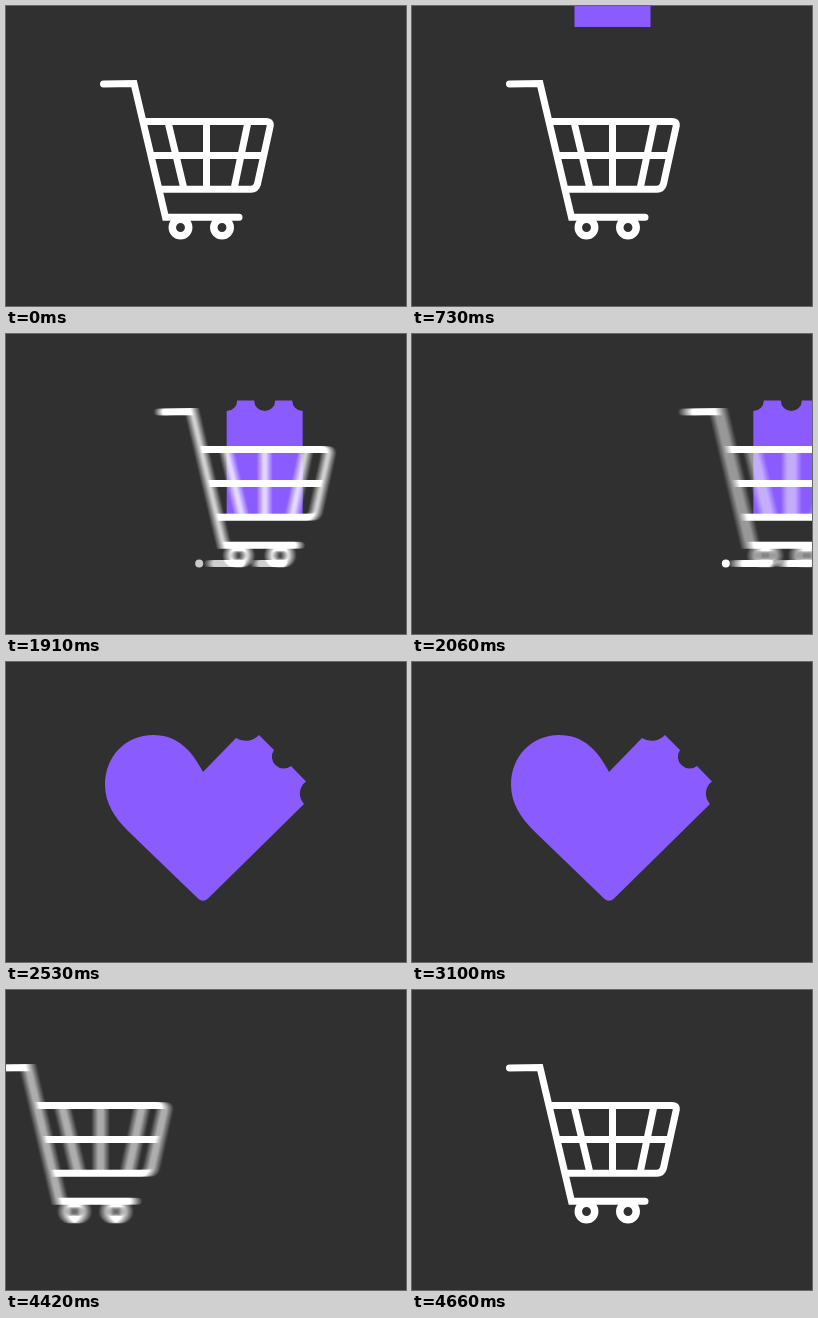
An HTML page with a canvas that plays this animation: 400 px wide and 300 px high, repeating every 4.69 s.

```html
<!DOCTYPE html>
<html lang="en">
<head>
<meta charset="utf-8">
<title>Cart and heart</title>
<style>
  html, body { margin: 0; width: 100%; height: 100%; overflow: hidden; background: #303030; }
  canvas { display: block; }
</style>
</head>
<body>
<canvas id="stage" width="400" height="300"></canvas>
<script>
const WIDTH = 400, HEIGHT = 300, LOOP = 4690, FRAME = 30;
const BACKGROUND = '#303030', PURPLE = '#8a5cff', WHITE = '#fff';
const BLUR_SAMPLES = 15;

const ctx = document.getElementById('stage').getContext('2d');

const ticket = new Path2D(`M173 66.5 H190 A10.5 10.5 0 0 0 211 66.5 H228
  A10.5 10.5 0 0 0 238.5 77 V180 H162.5 V77 A10.5 10.5 0 0 0 173 66.5 Z`);

const heart = new Path2D(`M197 110 C186 89 172 73 147 73 C120 73 99 94 99 123
  C99 141 109 156 121 168 L192 236.5 Q197 241 202 236.5 L298 142
  A15 15 0 0 1 300 119.5 L285 104 A11.8 11.8 0 0 1 268 88 L253 73
  A18 18 0 0 1 230 76 Z`);

function makeLayer(paint) {
  const canvas = document.createElement('canvas');
  canvas.width = WIDTH;
  canvas.height = HEIGHT;
  const layer = canvas.getContext('2d');
  layer.strokeStyle = layer.fillStyle = WHITE;
  layer.lineWidth = 7;
  if (paint) paint(layer);
  return layer;
}

function stroke(layer, path, cap = 'butt') {
  layer.lineCap = cap;
  layer.stroke(new Path2D(path));
}

const cart = makeLayer(layer => {
  stroke(layer, 'M97.5 78 L128 77.5 L159.5 211.3 H233', 'round');
  stroke(layer, 'M138 115.5 H260 Q265.5 115.5 264 121 L251.5 178 Q250 183.2 245 183.2 H153');
  stroke(layer, 'M146 149.5 H257 M162 116 L178 183 M200.5 112 V183 M242 116 L228 183');
  layer.lineWidth = 7.5;
  for (const x of [174.5, 216]) {
    layer.beginPath();
    layer.arc(x, 221.5, 8.2, 0, 2 * Math.PI);
    layer.stroke();
  }
});

const trails = makeLayer(layer => stroke(layer, 'M147.5 229.5 H174 M193.5 229.5 H216', 'round'));
const blurred = makeLayer();

// Averages copies of the layers spread over half a frame of travel.
function drawMoving(offset, speed, trailAlpha) {
  blurred.globalCompositeOperation = 'source-over';
  blurred.clearRect(0, 0, WIDTH, HEIGHT);
  blurred.globalCompositeOperation = 'lighter';
  const count = speed ? BLUR_SAMPLES : 1;
  for (let i = 0; i < count; i++) {
    const x = offset + ((i + 0.5) / count - 0.5) * speed / 2;
    blurred.globalAlpha = 1 / count;
    blurred.drawImage(cart.canvas, x, 0);
    if (trailAlpha) {
      blurred.globalAlpha = trailAlpha / count;
      blurred.drawImage(trails.canvas, x, 0);
    }
  }
  ctx.drawImage(blurred.canvas, 0, 0);
}

function drawTicket(x, y) {
  ctx.save();
  ctx.translate(x, y);
  ctx.fillStyle = PURPLE;
  ctx.fill(ticket);
  ctx.restore();
}

function drawDot(x, alpha) {
  ctx.globalAlpha = alpha;
  ctx.fillStyle = WHITE;
  ctx.beginPath();
  ctx.arc(x, 229.5, 4, 0, 2 * Math.PI);
  ctx.fill();
  ctx.globalAlpha = 1;
}

// Steps of one frame since a start time, counted from 1.
const stepsSince = (time, start) => Math.max(0, Math.floor((time - start) / FRAME) + 1);

const exitOffset = step => 4.29 * step ** 1.62;
const enterOffset = step => -290 * (1 - Math.min(1, step / 14)) ** 1.8;

function drawExit(time) {
  const step = stepsSince(time, 1790);
  const offset = exitOffset(step);
  const speed = step ? exitOffset(step + 0.5) - exitOffset(step - 0.5) : 0;
  const trailAlpha = Math.min(1, step * 0.15);
  drawTicket(offset, 0);
  drawMoving(offset, speed, trailAlpha);
  drawDot(135 + offset, trailAlpha);
}

function drawEntry(time) {
  const step = stepsSince(time, 4270);
  const speed = step < 14 ? enterOffset(step + 0.5) - enterOffset(step - 0.5) : 0;
  drawMoving(enterOffset(step), speed, 0);
}

function draw(time) {
  ctx.fillStyle = BACKGROUND;
  ctx.fillRect(0, 0, WIDTH, HEIGHT);
  if (time < 1790) {
    const drop = Math.min(1, stepsSince(time, 700) / 9);
    if (drop) drawTicket(0, -90 * (1 + Math.cos(Math.PI * drop)));
    drawMoving(0, 0, 0);
  } else if (time < 2210) {
    drawExit(time);
  } else if (time >= 2410 && time < 4070) {
    ctx.globalAlpha = Math.min(1, stepsSince(time, 2410) / 5);
    ctx.fillStyle = PURPLE;
    ctx.fill(heart);
    ctx.globalAlpha = 1;
  } else if (time >= 4270) {
    drawEntry(time);
  }
}

const startTime = performance.now();
function tick() {
  draw((performance.now() - startTime) % LOOP);
  requestAnimationFrame(tick);
}
tick();
</script>
</body>
</html>
```
